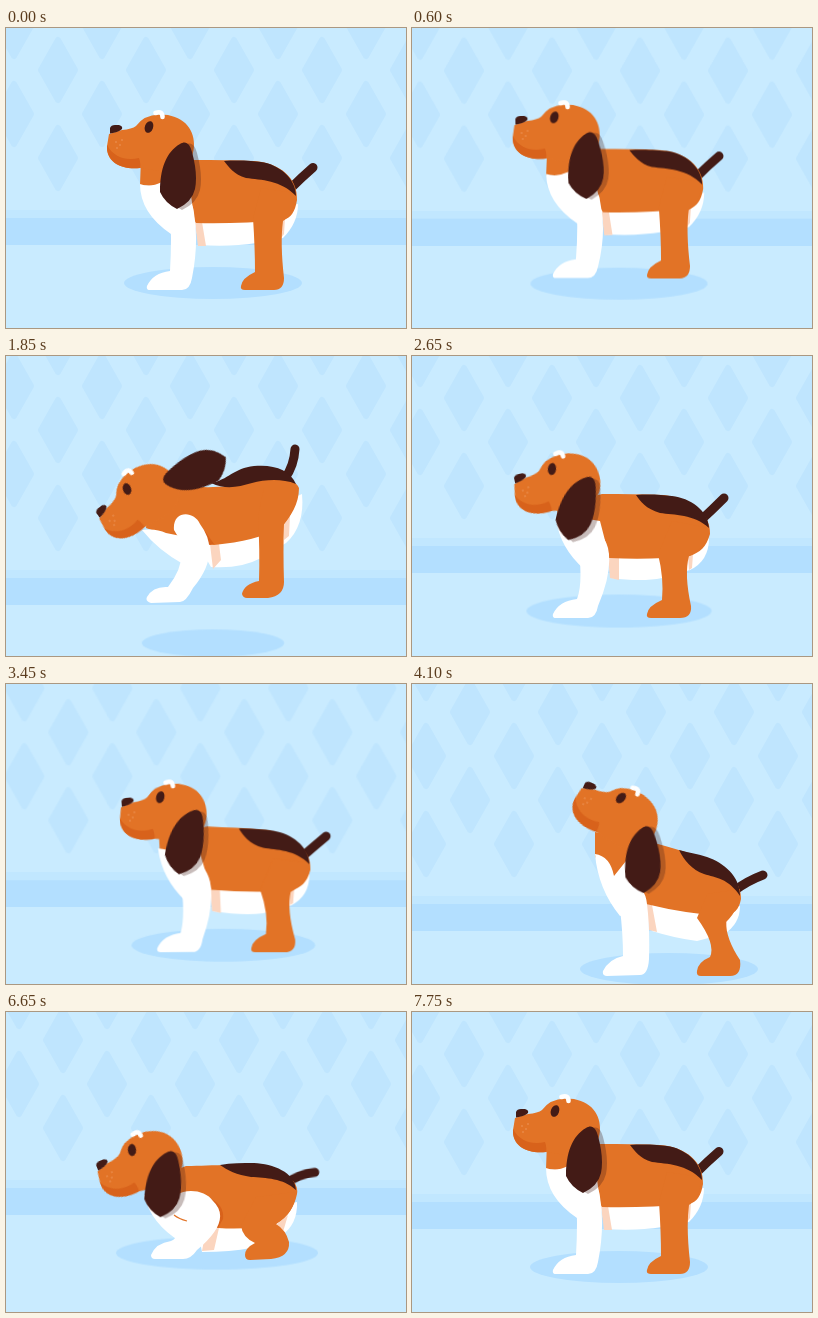
Recreate the animation shown at these times as an HTML page without scripts. Size 400 by 300 pixels, loop 7800 ms.

```html
<!DOCTYPE html>
<html lang="en">
<head>
<meta charset="utf-8">
<title>Hopping puppy</title>
<style>
html, body { margin: 0; width: 100%; height: 100%; overflow: hidden; background: #c9ebff; }
svg { display: block; width: 100vw; height: 100vh; }

.orange { fill: #e27326; }
.dark { fill: #431b16; }
.rust { fill: #d8621b; }
.white { fill: #fff; }
.peach { fill: #fbd5bf; }
.sky { fill: #b3dfff; }

/* Poses: a stand, b first fall, c second fall, d settle, e look up, f crouch */
.pose { animation: pose 7.8s ease-in-out infinite; }
@keyframes pose {
  0%, .7%, 7.2%, 16.8%, 98.7%, 100% { d: var(--a); transform: var(--ta); }
  10.8%, 13.46% { d: var(--b); transform: var(--tb); }
  20.8%, 23.72% { d: var(--c); transform: var(--tc); }
  14.7%, 25%, 30.8%, 41% { d: var(--d); transform: var(--td); }
  51.3%, 56% { d: var(--e); transform: var(--te); }
  5.13%, 15.8%, 26.7%, 66%, 91.7% { d: var(--f); transform: var(--tf); }
}

.cam { animation: cam 7.8s ease-in-out infinite; }
@keyframes cam {
  0%, 7.2%, 30.8%, 41%, 98.7%, 100% { transform: translate(0, 0); }
  10.8% { transform: translate(0, 17px); }
  13.46% { transform: translate(0, 23px); }
  16.8% { transform: translate(0, 7px); }
  20.8% { transform: translate(0, 20px); animation-timing-function: ease-out; }
  23.72% { transform: translate(0, 32px); }
  51.3%, 56% { transform: translate(50px, 30px); }
  66%, 91.7% { transform: translate(5px, -14px); }
}

.hop { animation: hop 7.8s linear infinite; }
@keyframes hop {
  0%, 7.2% { transform: translateY(0); animation-timing-function: ease-out; }
  10.8% { transform: translateY(-46px); animation-timing-function: ease-in; }
  13.46% { transform: translateY(0); }
  16.8% { transform: translateY(0); animation-timing-function: ease-out; }
  20.8% { transform: translateY(-56px); animation-timing-function: ease-in; }
  23.72%, 100% { transform: translateY(0); }
}

/* Parts seen only while the ear hangs, or only in the crouch */
.hang { opacity: .3; animation: hang 7.8s linear infinite; }
@keyframes hang {
  0%, 8%, 15.5%, 17.5%, 25.5%, 100% { opacity: .3; }
  9.5%, 14.2%, 19%, 24.4% { opacity: 0; }
}
.crease { opacity: 0; animation: crease 7.8s linear infinite; }
@keyframes crease {
  0%, 64%, 93%, 100% { opacity: 0; }
  66%, 91.7% { opacity: 1; }
}

.wag { transform-origin: 278px 178px; animation: wag 7.8s ease-in-out infinite; }
@keyframes wag {
  0%, 34.5%, 40%, 70%, 90%, 100% { transform: rotate(0); }
  36%, 73%, 79%, 85% { transform: rotate(-6deg); }
  38%, 76%, 82%, 88% { transform: rotate(4deg); }
}
.nod { transform-origin: 170px 190px; animation: nod 7.8s ease-in-out infinite; }
@keyframes nod {
  0%, 72%, 82%, 100% { transform: rotate(0); }
  75%, 79% { transform: rotate(2.5deg); }
}

.shadow {
  --ta: translate(207px, 255px) scale(1);
  --tb: translate(207px, 255px) scale(.87, .94);
  --tc: translate(207px, 255px) scale(.8, .85);
  --td: translate(207px, 255px) scale(1.04, 1.03);
  --te: translate(207px, 255px) scale(1);
  --tf: translate(206px, 255px) scale(1.135, 1.03);
}
.tail {
  fill: none; stroke: #431b16; stroke-width: 9; stroke-linecap: round;
  --a: path("M284 161Q296 149 307 139.5");
  --b: path("M284 110Q293 98 307 91");
  --c: path("M279 90Q288 78 289 61");
  --d: path("M288 165Q301 153 312 142");
  --e: path("M272 177Q285 167 301 161");
  --f: path("M273 186Q287 177 304 177");
}
.belly {
  --a: path("M188 190L193 217Q225 219 250 215L277 210Q292 195 292 176Z");
  --b: path("M190 157L200 188Q235 186 250 180L278 170Q298 155 297 129Z");
  --c: path("M190 153L205 179Q235 181 255 170L280 155Q299 138 296 106Z");
  --d: path("M195 198L199 222Q230 226 250 222L278 214Q297 205 297 182Z");
  --e: path("M182 185L190 217Q212 224 235 227L262 220Q278 210 278 192Z");
  --f: path("M185 224L191 254Q220 254 240 250L270 238Q287 226 286 204Z");
}
.inner {
  --a: path("M189 194L196 194L200 218L192 218ZM273 192L279 190L278 206L275 210Z");
  --b: path("M206 172L216 162L213 180L199 188ZM270 155L278 152L275 170L270 165Z");
  --c: path("M204 156L213 156L215 172L207 181ZM278 136L284 127L283 148L278 152Z");
  --d: path("M196 201L207 202L207 224L198 222ZM276 200L281 198L280 212L277 214Z");
  --e: path("M184 189L190 191L195 218L187 216ZM260 202L266 200L264 217L261 218Z");
  --f: path("M195 231L208 230L203 252L191 253ZM266 226L277 217L272 234L268 238Z");
}
.body {
  --a: path("M134 157L135 130L188 132C210 132 230 132 248 133C274 135 292 150 291 172C289 184 285 190 277 192Q232 196 190 195Q170 158 134 157Z");
  --b: path("M138 143L140 127L176 95C195 99 212 99 235 99C262 95 300 107 296 129C290 145 280 149 270 155Q245 162 215 163Q175 160 138 143Z");
  --c: path("M140 140L142 123L165 93C185 100 200 100 225 98C255 90 288 86 293 100C293 116 285 128 275 140Q250 153 208 157Q175 153 140 140Z");
  --d: path("M146 164L145 150L190 138C210 138 230 138 252 139C276 142 299 156 298 178C294 192 288 196 278 200Q240 204 197 202Q185 165 146 164Z");
  --e: path("M133 142L133 118L196 130C210 134 225 138 240 143C262 150 280 168 279 185C277 196 272 200 262 202Q225 200 184 190Q155 190 133 142Z");
  --f: path("M135 199L135 184L175 168C190 168 200 167 220 167C250 167 290 174 286 196C283 210 277 218 265 226Q240 232 207 230Q185 199 135 199Z");
}
.shade {
  --a: path("M175 180Q180 184 184 190L184 193L175 190Z");
  --b: path("M190 136Q225 145 221 159L215 163L190 160Z");
  --c: path("M192 134Q200 144 208 156L204 157L190 150Z");
  --d: path("M175 184Q180 186 186 192L186 195L175 192Z");
  --e: path("M170 190Q174 192 178 196L178 199L170 196Z");
  --f: path("M190 198Q214 203 212 221L207 230L180 220Z");
}
.hind {
  --a: path("M247 190Q249 220 249 244Q236 250 235 258Q234 262 239 262L268 262Q278 262 278 250Q274 215 277 193Q290 185 288 165L255 160Z");
  --b: path("M243 152Q250 172 250 191Q240 197 238 207Q238 212 243 212L258 211Q280 205 278 189Q270 167 270 155Q292 145 294 122L255 127Z");
  --c: path("M252 128Q254 163 253 193Q238 196 236 206Q237 210 241 210L262 210Q278 208 278 194Q277 163 278 136Q292 118 292 100L258 100Z");
  --d: path("M246 198Q252 222 250 244Q236 250 235 258Q234 262 239 262L268 262Q280 262 279 250Q272 218 277 200Q297 190 297 172L260 165Z");
  --e: path("M235 204Q254 230 248 243Q236 248 235 257Q234 262 239 262L268 262Q280 262 278 246Q264 225 264 208Q278 195 278 175L245 180Z");
  --f: path("M230 227Q231 239 244 245Q234 250 234 257Q234 262 239 262L260 261Q279 259 278 244Q275 232 265 226Q285 214 284 194L245 199Z");
}
.saddle {
  --a: path("M218 133C232 132 248 133 255 134C272 136 290 150 290 168C275 152 255 152 240 150C228 147 222 138 218 133Z");
  --b: path("M200 99C220 95 232 101 245 98C265 94 290 99 294 116C275 106 255 110 240 111C228 111 215 107 200 99Z");
  --c: path("M205 95C222 92 228 80 248 78C268 76 284 82 290 96C275 90 258 92 246 95C232 99 220 102 205 95Z");
  --d: path("M224 139C238 138 250 139 260 140C278 142 296 154 297 172C282 158 262 159 248 157C234 153 228 145 224 139Z");
  --e: path("M217 136C228 139 236 140 245 143C262 149 278 162 278 182C266 164 254 164 242 160C230 156 222 146 217 136Z");
  --f: path("M209 167C220 165 232 165 243 165C262 166 284 174 285 192C272 180 255 180 240 179C226 177 216 172 209 167Z");
}
.chest {
  --a: path("M134 156Q144 160 156 154L184 160L189 196L165 206Q134 185 134 156Z");
  --b: path("M138 143Q150 136 158 143L172 150L185 172L172 180Q150 165 138 143Z");
  --c: path("M136 142Q150 140 160 145L175 148L190 168L177 176Q152 162 136 142Z");
  --d: path("M144 163Q152 164 158 160L188 165L197 200L172 213Q148 192 144 163Z");
  --e: path("M133 140Q148 142 152 162L164 147L185 195L158 202Q136 175 133 140Z");
  --f: path("M133 197Q142 198 147 194L175 199L195 229L170 244Q140 226 133 197Z");
}
.fore {
  --a: path("M164 180C164 165 187 165 188 185Q193 215 186 250Q184 262 176 262L144 262Q140 262 141 258Q147 245 164 243Q166 210 164 180Z");
  --b: path("M167 149C166 130 182 125 191 135Q238 165 190 189Q180 201 172 201L146 200Q141 199 142 195Q148 184 163 184Q178 177 167 149Z");
  --c: path("M168 142C166 122 188 122 194 136Q216 165 187 200Q180 214 174 214L145 215Q139 213 141 209Q147 198 162 199Q186 168 168 142Z");
  --d: path("M165 182C165 168 190 168 196 192Q201 215 186 250Q184 262 176 262L144 262Q140 262 141 258Q147 245 165 243Q172 225 165 182Z");
  --e: path("M158 195C158 165 183 165 185 190Q188 215 187 245Q186 261 178 261L145 262Q140 262 141 257Q147 245 161 242Q161 220 158 195Z");
  --f: path("M158 208C160 190 192 188 202 203Q222 222 186 252Q180 261 172 261L144 261Q140 261 140 257Q145 245 160 243Q172 240 158 208Z");
}
/* The head turns about the eye, the ear about its root */
.head {
  --ta: translate(143px, 99px) rotate(0deg);
  --tb: translate(126px, 96px) rotate(-28deg);
  --tc: translate(121px, 101px) rotate(-37deg);
  --td: translate(140px, 113px) rotate(-12deg);
  --te: translate(159px, 84px) rotate(24deg);
  --tf: translate(121px, 152px) rotate(-22deg);
}
.ear {
  --ta: translate(35px, 17px) rotate(0deg);
  --tb: translate(35px, 17px) rotate(-57deg);
  --tc: translate(35px, 17px) rotate(-81deg);
  --td: translate(35px, 17px) rotate(25deg);
  --te: translate(35px, 17px) rotate(-28deg);
  --tf: translate(35px, 17px) rotate(25deg);
}
</style>
</head>
<body>
<svg viewBox="0 0 400 300" preserveAspectRatio="none">
  <defs>
    <pattern id="tile" x="8" y="-2" width="88" height="88" patternUnits="userSpaceOnUse">
      <path d="M44 14L61 44L44 74L27 44Z" fill="#bfe5fe" stroke="#bfe5fe" stroke-width="6" stroke-linejoin="round"/>
    </pattern>
    <path id="flap" d="M-4 0C2 -4 6 0 8 8Q14 30 11 45Q8 58 -7 65Q-19 59 -24 48C-24 25 -18 8 -4 0Z"/>
    <rect id="rows" x="-120" y="-178" width="700" height="352" fill="url(#tile)"/>
  </defs>
  <rect width="400" height="300" fill="#c9ebff"/>
  <g class="cam">
    <use href="#rows"/>
    <use href="#rows" transform="translate(-44 -44)"/>
    <rect x="-100" y="182" width="600" height="8" fill="#c1e7ff"/>
    <rect class="sky" x="-100" y="190" width="600" height="27"/>
    <ellipse class="sky shadow pose" rx="89" ry="16"/>
    <g class="hop">
      <g class="wag"><path class="tail pose"/></g>
      <path class="white belly pose"/>
      <path class="peach inner pose"/>
      <path class="orange body pose"/>
      <path class="rust shade pose"/>
      <path class="orange hind pose"/>
      <path class="dark saddle pose"/>
      <path class="white chest pose"/>
      <path class="white fore pose"/>
      <path class="crease" d="M163 217Q168 221 176 223" fill="none" stroke="#e27326" stroke-width="1.2"/>
      <g class="nod">
        <g class="head pose">
          <path class="orange" d="M-40 7L-27 3Q-17 2 -13 -1Q-5 -12 10 -12.5C33 -13 45 1 45 17C45 36 32 45 17 45L-9 41C-28 43 -43 35 -42 19Z"/>
          <path class="rust" d="M-42 18C-35 31 -22 34 -10 31Q-8 37 -9 41C-28 43 -43 35 -42 18Z"/>
          <path class="dark" d="M-39 1Q-38 -2 -34 -2L-30 -2Q-26 -1 -27 2Q-30 5 -39 6.5Z"/>
          <ellipse class="dark" rx="4.1" ry="6" transform="rotate(20)"/>
          <path d="M6.5 -14Q13.500 -16.500 13.500 -10" fill="none" stroke="#fff" stroke-width="4.6" stroke-linecap="round"/>
          <g fill="#f0a06a">
            <circle cx="-33" cy="15" r=".7"/>
            <circle cx="-29" cy="18" r=".7"/>
            <circle cx="-32" cy="21" r=".7"/>
            <circle cx="-27" cy="13" r=".7"/>
          </g>
          <g class="ear pose">
            <g class="hang"><use class="dark" href="#flap" x="5" y="1"/></g>
            <use class="dark" href="#flap"/>
          </g>
        </g>
      </g>
    </g>
  </g>
</svg>
</body>
</html>
```
